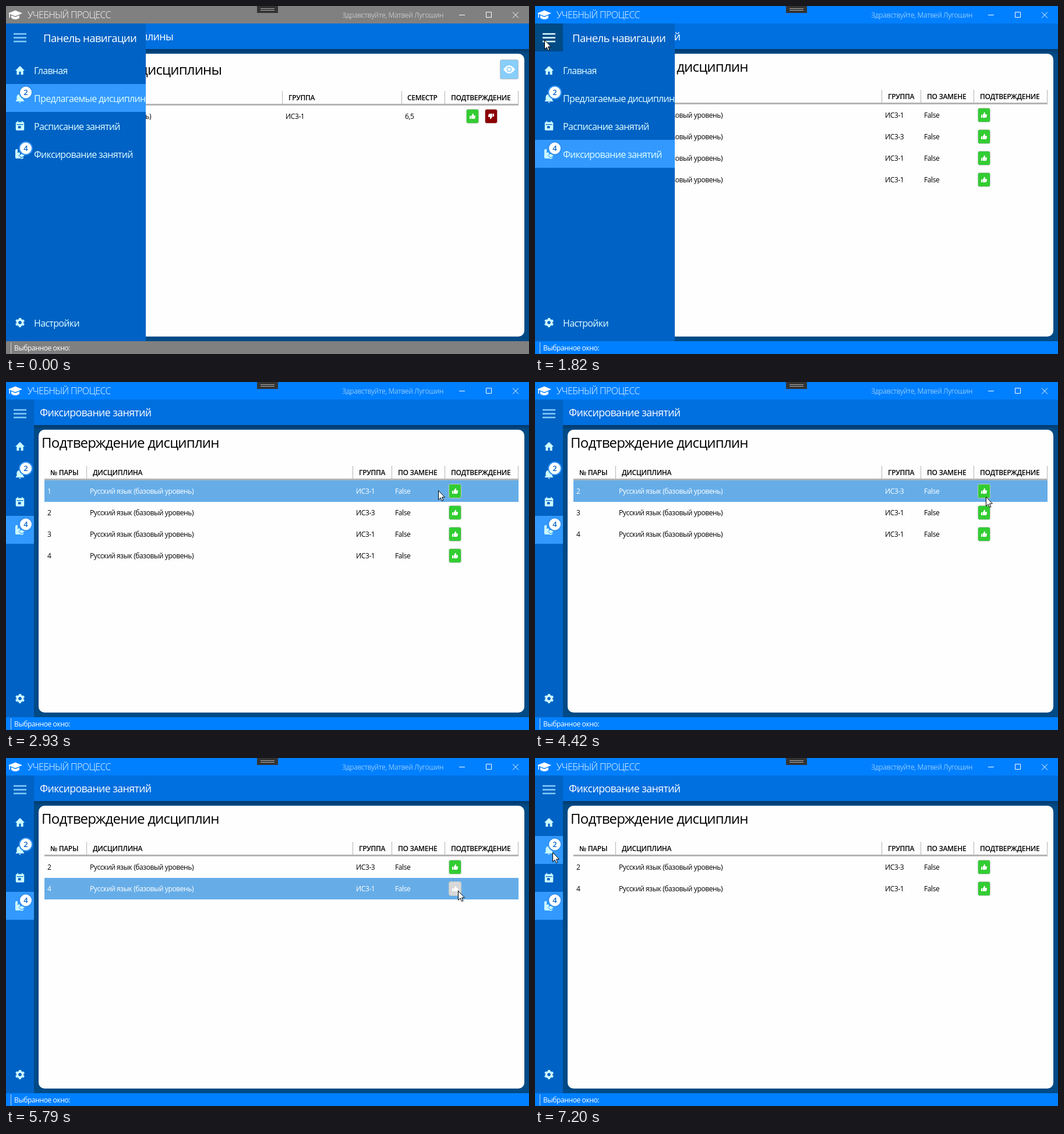
Recreate the animation shown at these times as an HTML page. Size 898x598 px, loop 7260 ms.

```html
<!DOCTYPE html>
<html lang="ru">
<head>
<meta charset="utf-8">
<title>Учебный процесс</title>
<style>
html, body { margin: 0; width: 100%; height: 100%; overflow: hidden; background: #004a86; }
#stage { display: block; width: 898px; height: 598px; }
text { font: 12px "Open Sans", "Noto Sans", sans-serif; letter-spacing: -.033em; white-space: pre; }
.app { font-size: 16px; font-weight: 300; letter-spacing: -.036em; fill: #fff; }
.nav { font-size: 18.6px; letter-spacing: -.035em; fill: #fff; }
.item { font-size: 16px; letter-spacing: -.041em; fill: #e0ffff; }
.bar { font-size: 17.8px; fill: #fff; }
.title { font-size: 24px; }
.head text { font-weight: 600; letter-spacing: -.027em; }
.head path { stroke: #b4b4b4; fill: none; }
.badge text { font-size: 13px; font-weight: 600; fill: #0063c6; text-anchor: middle; letter-spacing: 0; }
.badge circle { fill: #fff; stroke: #2f8ff0; stroke-width: 2; }
.icon { fill: #ccfcff; }
.row rect.back { fill: none; }
.row.on rect.back { fill: #66ade8; }
.row.on text { fill: #fff; }
</style>
</head>
<body>
<svg id="stage" viewBox="0 0 898 598">
  <defs>
    <linearGradient id="shade" x2="0" y2="1">
      <stop stop-color="#003a6c"/><stop offset="1" stop-color="#004a86"/>
    </linearGradient>
    <path id="thumb" fill="#fff" d="M-5-.5h2v5h-2ZM-2.3-.5L.8-5Q2.6-4.6 1.8-1.2H4.4Q5.6-.8 5 1L4 4Q3.8 4.6 3 4.6H-2.3Z"/>
  </defs>

  <rect width="898" height="598" fill="#004a86"/>
  <rect y="74" width="898" height="8" fill="url(#shade)"/>
  <rect y="30" width="898" height="44" fill="#006fdf"/>
  <rect x="56" y="82" width="834" height="486" rx="10" fill="#fefefe"/>

  <g id="offers">
    <text class="bar" x="58" y="59">Предлагаемые дисциплины</text>
    <text class="title" x="61" y="118">Предлагаемые дисциплины</text>
    <rect x="848.5" y="92.5" width="31" height="33" rx="2.5" fill="#87cefa" stroke="#b5bcc2"/>
    <path d="M854 109q10-14 20 0q-10 14-20 0Z" fill="#fff"/>
    <circle cx="864" cy="109" r="3.6" fill="#fff" stroke="#87cefa" stroke-width="1.8"/>
    <g class="head">
      <path d="M474.5 146v23M679.5 146v23M753.5 146v23M879.5 146v23"/>
      <path d="M66 169.5H880" stroke-width="3"/>
      <text x="76" y="162">ДИСЦИПЛИНА</text><text x="485" y="162">ГРУППА</text>
      <text x="689" y="162">СЕМЕСТР</text><text x="764" y="162">ПОДТВЕРЖДЕНИЕ</text>
    </g>
    <text x="71" y="194">Русский язык (базовый уровень)</text>
    <text x="480" y="194">ИС3-1</text><text x="685" y="194">6,5</text>
    <rect x="790.5" y="177.5" width="21" height="24" rx="3" fill="#32cd32" stroke="#bcc8bc"/>
    <use href="#thumb" x="801" y="189.5"/>
    <rect x="822.5" y="177.5" width="21" height="24" rx="3" fill="#8b0000" stroke="#c8bcbc"/>
    <use href="#thumb" transform="translate(833 189.5) rotate(180)"/>
  </g>

  <g id="lessons">
    <text class="bar" x="58" y="59">Фиксирование занятий</text>
    <text class="title" x="61" y="113">Подтверждение дисциплин</text>
    <g class="head">
      <path d="M138.5 144v23M595.5 144v23M662.5 144v23M753.5 144v23M879.5 144v23"/>
      <path d="M66 167.5H880" stroke-width="3"/>
      <text x="76" y="160">№ ПАРЫ</text><text x="149" y="160">ДИСЦИПЛИНА</text>
      <text x="606" y="160">ГРУППА</text><text x="673" y="160">ПО ЗАМЕНЕ</text>
      <text x="764" y="160">ПОДТВЕРЖДЕНИЕ</text>
    </g>
    <g id="rows"></g>
  </g>

  <svg id="side" width="240" height="576">
    <rect y="30" width="240" height="546" fill="#0062c4"/>
    <rect id="burgerBack" y="30" width="48" height="48" fill="#004a86"/>
    <path id="burger" d="M13 48h22M13 54.5h22M13 61h22" stroke-width="2.4"/>
    <text class="nav" x="64" y="62">Панель навигации</text>
    <g id="items"></g>
    <g class="icon">
      <path transform="translate(14.4 100.4) scale(.8 .88)" d="M10 20V14H14V20H19V12H22L12 3 2 12H5V20Z"/>
      <path transform="translate(14.4 148) scale(.8)" d="M3 20V19L5 17V11a7 7 0 0 1 14 0v6l2 2v1ZM10 21h4a2 2 0 0 1-4 0"/>
      <path transform="translate(14.4 197) scale(.8)" fill-rule="evenodd" d="M19 3H18V1H16V3H8V1H6V3H5A2 2 0 0 0 3 5V19A2 2 0 0 0 5 21H19A2 2 0 0 0 21 19V5A2 2 0 0 0 19 3ZM19 9H5V7.500H19ZM8 11.500h6v5h-6Z"/>
      <path d="M17 246h3v7l2-2 2 2v2l-3 2 3 2v3h-7q-1-.5-1-2v-12ZM22 257l5-3 5 3-5 3ZM24 259.5l3 1.7 3-1.7v2l-3 1.6-3-1.6Z"/>
      <g fill="none" stroke="#ccfcff" transform="translate(24 544) rotate(15)">
        <circle r="4.6" stroke-width="3.6"/>
        <circle r="6.6" stroke-width="3" stroke-dasharray="3.456"/>
      </g>
    </g>
    <g class="badge"><circle cx="34" cy="148.5" r="11"/><text x="34" y="153.4">2</text></g>
    <g class="badge"><circle cx="34" cy="244.5" r="11"/><text x="34" y="249.4">4</text></g>
  </svg>

  <g id="frame"><rect width="898" height="30"/><rect y="576" width="898" height="22"/></g>
  <path d="M4 12.5L16 7.5 28 12.5 16 17.5ZM9 16l7 3 7-3v4.5q-7 5-14 0ZM5.5 13h1.5v7h-1.5Z" fill="#fff"/>
  <text class="app" x="37" y="21">УЧЕБНЫЙ ПРОЦЕСС</text>
  <text id="hello" x="751" y="20" text-anchor="end">Здравствуйте, Матвей Лугошин</text>
  <path d="M778 15.5h10M824.5 10.5h9v9h-9ZM870 10.5l10 10M880 10.5l-10 10" fill="none" stroke="#fff"/>
  <path d="M431 0h36v12h-36Z" fill="#333"/>
  <path d="M437 4.5h24M437 7.5h24" stroke="#b0b0b0"/>
  <path d="M8.5 578v19" stroke="#cfd6dd"/>
  <text x="14" y="592" fill="#fff">Выбранное окно:</text>

  <path id="cursor" d="M.5 .5V16.3L4.1 12.9 6.5 18.4 8.9 17.4 6.5 12H11.4Z" fill="#fff" stroke="#000" stroke-linejoin="round"/>
</svg>

<script>
const LOOP = 7260;
const $ = id => document.getElementById(id);
const show = (el, on) => el.setAttribute('display', on ? 'inline' : 'none');

// Pointer moves: start, end, number of steps, then the points passed
const moves = [
  [60, 730, 12, [362, 485], [290, 440], [216, 367], [152, 284], [136, 250], [135, 246]],
  [1130, 1820, 12, [120, 200], [70, 120], [25, 70], [16, 58]],
  [1880, 2570, 13, [16, 58], [40, 66], [150, 100], [360, 145], [540, 164], [610, 160]],
  [2630, 2930, 6, [640, 165], [700, 178], [742, 186]],
  [3040, 3210, 4, [765, 184], [775, 183]],
  [4420, 4710, 6, [773, 225], [773, 255]],
  [4770, 5110, 6, [775, 258], [776, 240], [776, 231]],
  [5170, 5290, 3, [776, 228]],
  [6070, 6740, 13, [700, 226], [560, 220], [381, 226]],
  [6800, 7200, 8, [250, 205], [110, 175], [30, 162]]
];

function pointer(t) {
  let pos = null;
  for (const [from, to, steps, ...points] of moves) {
    if (t < from) break;
    const path = pos ? [pos, ...points] : points;
    const step = Math.floor((t - from) / (to - from) * (steps - 1) + 1e-6);
    const u = Math.min(1, (step + 1) / steps) * (path.length - 1);
    const i = Math.min(path.length - 2, Math.floor(u));
    pos = path[i].map((a, k) => a + (path[i + 1][k] - a) * (u - i));
  }
  return pos;
}

const itemTop = [86, 134, 182, 230, 520];
const itemNames = ['Главная', 'Предлагаемые дисциплины', 'Расписание занятий',
  'Фиксирование занятий', 'Настройки'];
$('items').innerHTML = itemNames.map((name, i) =>
  `<rect y="${itemTop[i]}" width="240" height="48"/>
   <text class="item" x="48" y="${itemTop[i] + 31}">${name}</text>`).join('');
const itemBacks = [...$('items').querySelectorAll('rect')];

$('rows').innerHTML = [0, 1, 2, 3].map(i =>
  `<g class="row" transform="translate(0 ${169 + 37 * i})">
    <rect class="back" x="66" width="814" height="37"/>
    <text class="num" x="71" y="23"></text>
    <text x="144" y="23">Русский язык (базовый уровень)</text>
    <text class="group" x="601" y="23"></text>
    <text x="668" y="23">False</text>
    <rect class="ok" x="760.5" y="6.5" width="21" height="24" rx="3" stroke="#c0c8c0"/>
    <use href="#thumb" x="771" y="18.5"/>
  </g>`).join('');
const rows = [...document.querySelectorAll('.row')].map(el => ({
  el,
  num: el.querySelector('.num'),
  group: el.querySelector('.group'),
  ok: el.querySelector('.ok')
}));

function sideWidth(t) {
  const u = Math.min(1, Math.max(0, (t - 1880) / 360));
  return Math.round(48 + 192 * (1 - u) ** 2);
}

function drawSide(t, x, y) {
  const width = sideWidth(t);
  const inside = x >= 0 && x < width;
  const selected = t < 850 ? 1 : 3;
  $('side').setAttribute('width', width);
  itemBacks.forEach((back, i) => {
    const hover = inside && y >= itemTop[i] && y < itemTop[i] + 48;
    const fill = i === selected ? (hover ? '#3866cb' : '#3399ff') : hover ? '#3399ff' : 'none';
    back.setAttribute('fill', fill);
  });
  const onBurger = inside && x < 48 && y >= 30 && y < 78;
  show($('burgerBack'), onBurger);
  $('burger').setAttribute('stroke', onBurger ? '#e0ffff' : '#87cefa');
}

function drawRows(t, x, y) {
  const list = t < 3590 ? [1, 2, 3, 4] : t < 5790 ? [2, 3, 4] : [2, 4];
  const hovered = x >= 66 && x < 880 && t > 2570 ? Math.floor((y - 169) / 37) : -1;
  const pressed = t >= 3370 && t < 4420 ? 0 : t >= 5620 && t < 6070 ? 1 : -1;
  rows.forEach((row, i) => {
    show(row.el, i < list.length);
    if (i >= list.length) return;
    row.el.classList.toggle('on', i === hovered);
    row.num.textContent = list[i];
    row.group.textContent = list[i] === 2 ? 'ИС3-3' : 'ИС3-1';
    row.ok.setAttribute('fill', i === pressed ? '#d8d8da' : '#32cd32');
  });
}

function draw(t) {
  const pos = pointer(t);
  const [x, y] = pos || [-99, -99];
  const active = t >= 790;
  const newPage = t >= 910;
  show($('offers'), !newPage);
  show($('lessons'), newPage);
  $('frame').setAttribute('fill', active ? '#0080ff' : '#808080');
  $('hello').setAttribute('fill', active ? '#8fc6fb' : '#c3c3c3');
  drawSide(t, x, y);
  drawRows(t, x, y);
  show($('cursor'), pos);
  $('cursor').setAttribute('transform', `translate(${Math.round(x)} ${Math.round(y)})`);
}

const start = performance.now();
function tick() {
  draw((performance.now() - start) % LOOP);
  requestAnimationFrame(tick);
}
tick();
</script>
</body>
</html>
```
